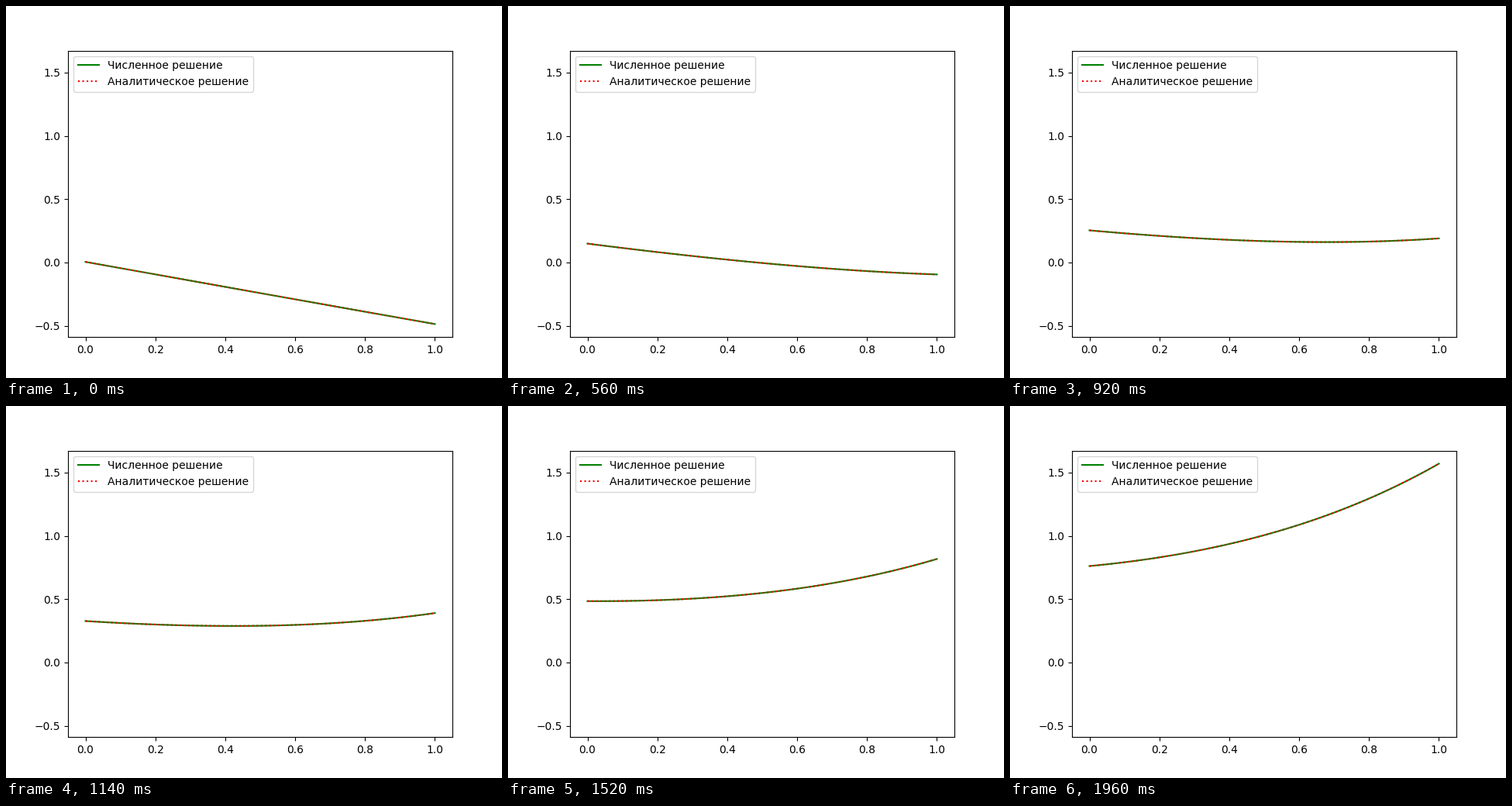
These frames come from a looping animation (640 by 480 pixels, 1.98 s). A matplotlib script:

```python
import numpy as np
import matplotlib.pyplot as plt
from matplotlib.animation import FuncAnimation

FRAMES = 99
INTERVAL = 20  # ms

plt.rcParams["font.family"] = "DejaVu Sans"

x = np.linspace(0, 1, 101)


def solution(t):
    return (np.exp(x) * np.tan(t) - x) / 2


def moment(i):
    return (i + 1) / 100


fig, ax = plt.subplots(figsize=(6.4, 4.8), dpi=100)

start = solution(moment(0))
low, high = start.min(), solution(moment(FRAMES - 1)).max()
pad = 0.05 * (high - low)
ax.set_xlim(-0.05, 1.05)
ax.set_ylim(low - pad, high + pad)

numeric, = ax.plot(x, start, "g-", label="Численное решение")
analytic, = ax.plot(x, start, "r:", label="Аналитическое решение")
ax.legend(loc="upper left")


def update(i):
    u = solution(moment(i))
    numeric.set_ydata(u)
    analytic.set_ydata(u)
    return numeric, analytic


anim = FuncAnimation(fig, update, frames=FRAMES, interval=INTERVAL,
                     repeat=True, repeat_delay=0, blit=False)
plt.show()
```
